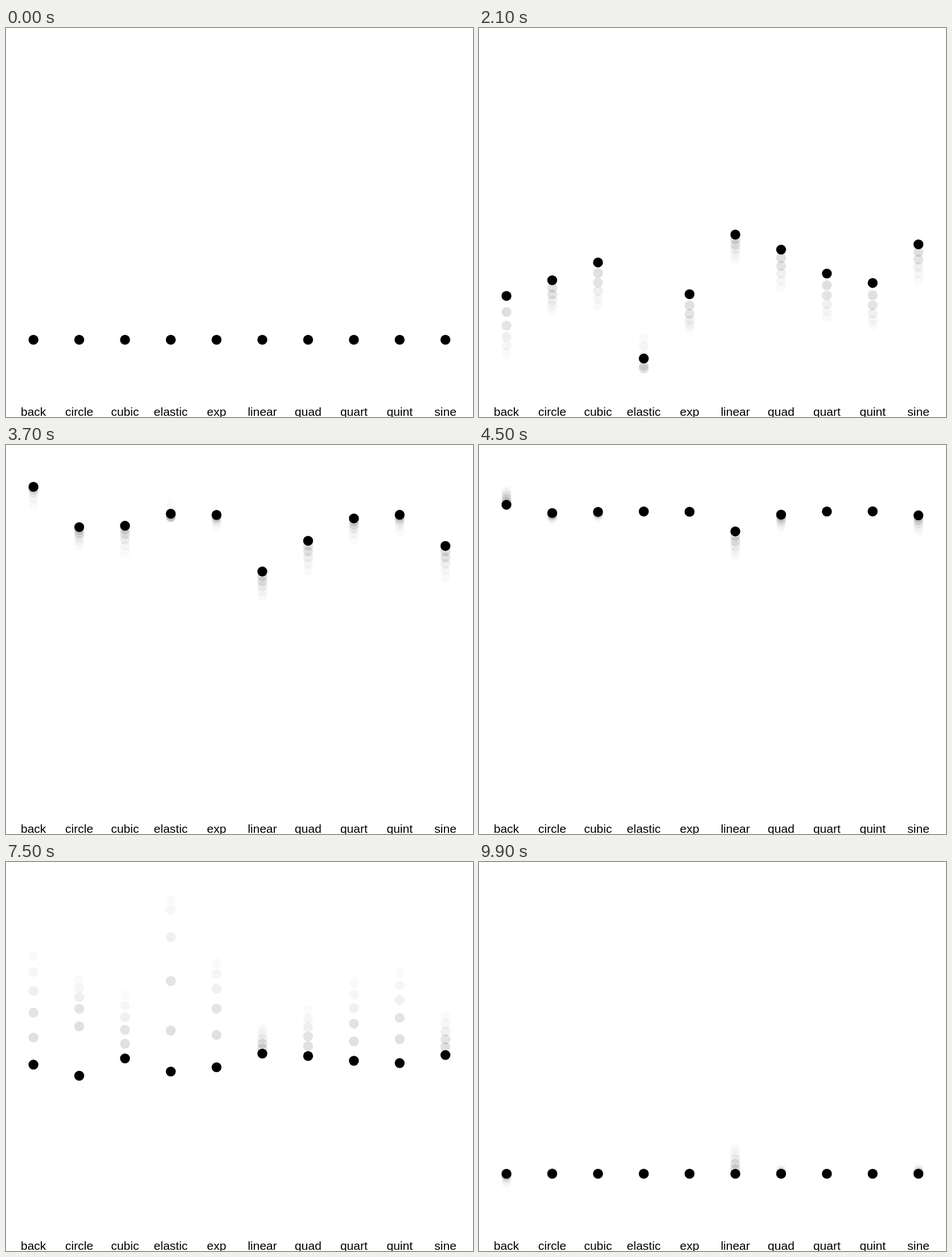
Animation of 820x683 px, one loop 10000 ms. Source, as an HTML page:

```html
<!DOCTYPE html>
<html lang="en">
<head>
<meta charset="utf-8">
<title>Easing functions</title>
<style>
  html, body { margin: 0; width: 100%; height: 100%; overflow: hidden; background: #fff; }
  svg { display: block; }
  text { font: 21px "Liberation Sans", Arial, sans-serif; text-anchor: middle; }
</style>
</head>
<body>
<svg id="stage" width="820" height="683" viewBox="0 0 820 683"></svg>
<script>
const FRAME_MS = 100, FRAMES = 100, HALF = FRAMES / 2;
const LEFT = 48.2, GAP = 80.38, RADIUS = 8.7;
const BOTTOM = 547.4, TOP = 116.5, BASELINE = 681;
const WAKE = [0.018, 0.035, 0.06, 0.105, 0.12]; // oldest to newest

const power = n => p => p ** n;
const OVERSHOOT = 1.70158 * 1.525;
const PERIOD = 0.45;

// Ease-in curves; inOut() joins each with its mirror image.
const curves = {
  back: p => p * p * ((OVERSHOOT + 1) * p - OVERSHOOT),
  circle: p => 1 - Math.sqrt(1 - p * p),
  cubic: power(3),
  elastic: p => p === 0 ? 0
    : -(2 ** (10 * (p - 1))) * Math.sin((p - 1 - PERIOD / 4) * 2 * Math.PI / PERIOD),
  exp: p => p === 0 ? 0 : 2 ** (10 * (p - 1)),
  linear: power(1),
  quad: power(2),
  quart: power(4),
  quint: power(5),
  sine: p => 1 - Math.cos(p * Math.PI / 2)
};

const inOut = (ease, t) => t < 0.5 ? ease(2 * t) / 2 : 1 - ease(2 - 2 * t) / 2;

function height(ease, frame) {
  const step = frame < HALF ? frame : FRAMES - 1 - frame;
  return BOTTOM + (TOP - BOTTOM) * inOut(ease, step / (HALF - 1));
}

const stage = document.getElementById("stage");

function add(tag, attrs) {
  const node = document.createElementNS("http://www.w3.org/2000/svg", tag);
  for (const key in attrs) node.setAttribute(key, attrs[key]);
  return stage.appendChild(node);
}

const columns = Object.entries(curves).map(([name, ease], i) => {
  const x = LEFT + i * GAP;
  add("text", { x, y: BASELINE }).textContent = name;
  const dots = [...WAKE, 1].map(alpha =>
    add("circle", { cx: x, cy: BOTTOM, r: RADIUS, "fill-opacity": alpha }));
  return { ease, dots };
});

function draw(frame) {
  for (const { ease, dots } of columns) {
    dots.forEach((dot, i) => {
      const past = frame - WAKE.length + i;
      dot.setAttribute("visibility", past < 0 ? "hidden" : "visible");
      if (past >= 0) dot.setAttribute("cy", height(ease, past).toFixed(2));
    });
  }
}

const start = performance.now();
function tick() {
  draw(Math.floor((performance.now() - start) / FRAME_MS) % FRAMES);
  requestAnimationFrame(tick);
}
tick();
</script>
</body>
</html>
```
